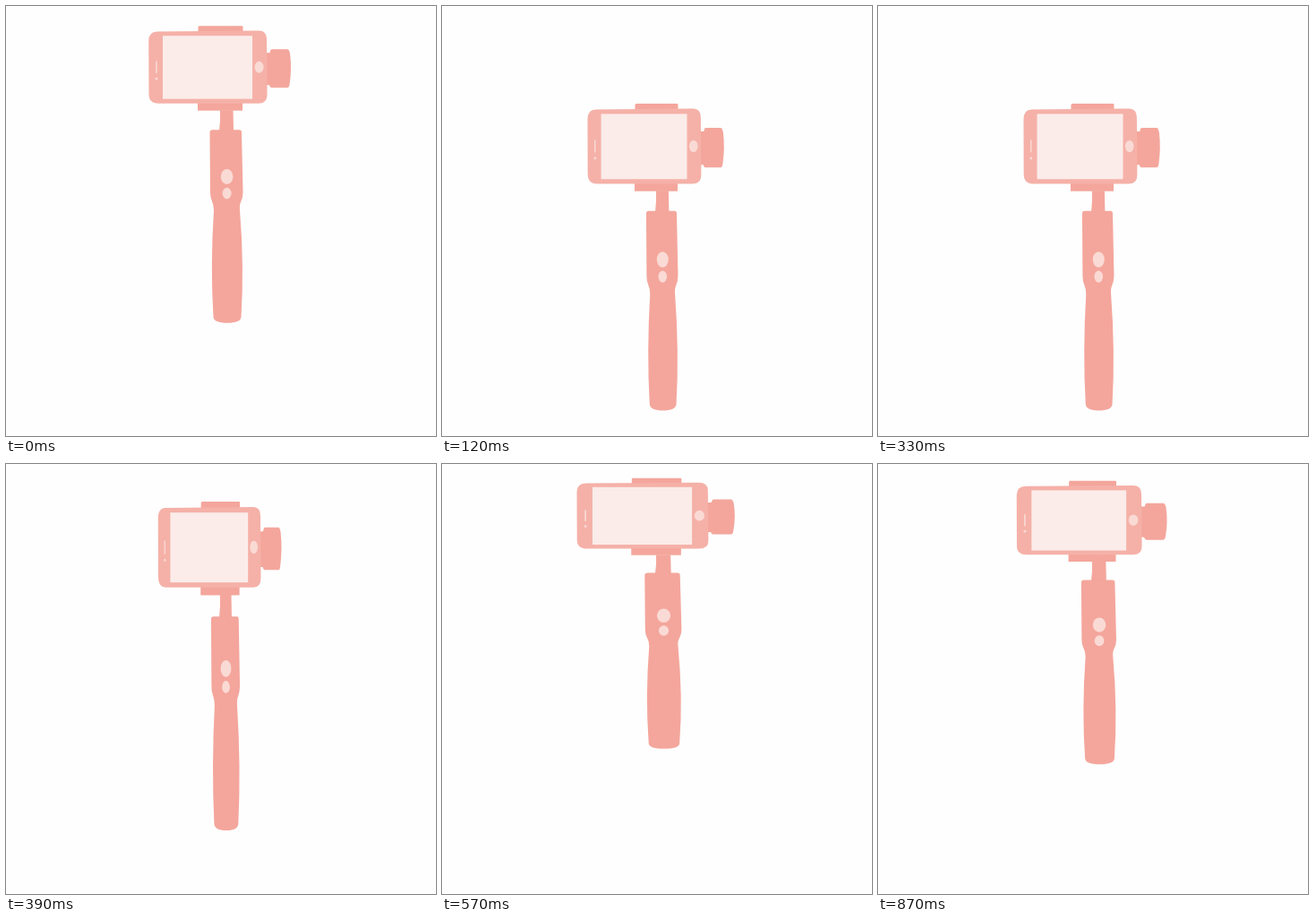
An HTML page for the animation above (900 ms loop, 480 px wide and 480 px high).

```html
<!DOCTYPE html>
<html lang="en">
<head>
<meta charset="utf-8">
<title>Bouncing gimbal</title>
<style>
  html, body { margin: 0; width: 100%; height: 100%; overflow: hidden; background: #fefefe; }
  svg { display: block; width: 100%; height: 100%; }
  .body { fill: #f4a69c; }
  .phone { fill: #f5b1a8; }
  .screen { fill: #fbece9; }
  .light { fill: #fadad5; }
</style>
</head>
<body>
<svg viewBox="0 0 480 480">
  <g id="gimbal">
    <g class="body">
      <path d="M216 22H263.5Q264.5 22 264.5 23L264 116.5H214V108L214.5 23.500Q214.500 22 216 22Z"/>
      <path d="M239 116H253.500L254 139H238Q239.500 128 239 116Z"/>
      <path d="M290 52H294.500Q295 48 297 48H314Q316 48 317 53Q319.200 70 316.500 87Q316 91 314 91H297Q294.500 91 294 88H290Z"/>
      <path d="M230.500 138H260.500Q263 138 263 141L264.500 208Q264.500 214 262 219Q260.500 222 261 228
        Q266 290 262.500 347Q262 353.800 247 353.800Q232 353.800 231.500 347Q228 290 232 228
        Q232 222 230 218Q228 214 228 208L227.500 141Q227.500 138 230.500 138Z"/>
    </g>
    <path class="phone" d="M169 28.300L282 27.300Q291 27.300 291 37L291.500 99Q291.500 108.500 282 108.500H170
      Q159.500 108.500 159.500 98L159.300 39Q159.300 28.300 169 28.300Z"/>
    <rect class="screen" x="175" y="33" width="100" height="70.500"/>
    <g class="light">
      <rect x="167.200" y="61" width="1.500" height="14" rx=".7"/>
      <circle cx="168" cy="81" r="1.400"/>
      <ellipse cx="282.500" cy="68" rx="5" ry="6.500"/>
      <ellipse cx="246.600" cy="190.500" rx="6.800" ry="8.500"/>
      <ellipse cx="246.600" cy="209" rx="5" ry="6.300"/>
    </g>
  </g>
</svg>
<script>
const STEP = 30, STEPS = 30, HALF = STEPS / 2, LOWEST = 7.5;
const ART = { centre: 238.5, top: 22, width: 159, height: 332 };
const gimbal = document.getElementById('gimbal');

// Asymmetric S-curve from 0 to 1
function ease(u, a, b, k) {
  const rise = u ** a, rest = k * (1 - u) ** b;
  return rise / (rise + rest);
}

function draw(now) {
  const step = Math.floor(now / STEP) % STEPS;
  const gap = Math.abs(step - LOWEST);
  const u = 1 - Math.min(gap, STEPS - gap) / HALF;

  // The lower end leads and the upper end follows, which stretches and squashes the shape
  const top = 15.5 + 192 * ease(u, 2.46, 2.9, 37.2);
  const bottom = 317.3 + 153 * ease(u, 4.61, 1.53, 0.375);
  const height = bottom - top;
  const width = 200 - 0.595 * (height - 263);

  gimbal.setAttribute('transform',
    `translate(${ART.centre} ${top}) scale(${width / ART.width} ${height / ART.height}) ` +
    `translate(${-ART.centre} ${-ART.top})`);
}

const start = performance.now();
function tick() {
  draw(performance.now() - start);
  requestAnimationFrame(tick);
}
tick();
</script>
</body>
</html>
```
